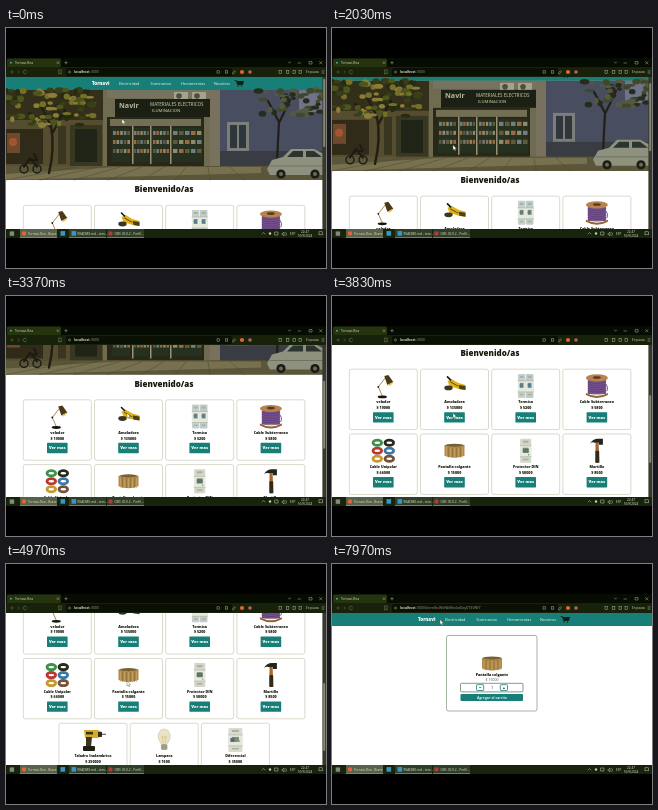
Write an HTML page that moves like this. It is 320 by 240 pixels and loops after 8000 ms.

```html
<!DOCTYPE html>
<html lang="es">
<head>
<meta charset="utf-8">
<title>Tienda</title>
<style>
html, body { margin: 0; width: 100%; height: 100%; overflow: hidden; background: #000; }
svg { display: block; width: 100%; height: 100%; }
text { font-family: "Open Sans", "Noto Sans", sans-serif; }
</style>
</head>
<body>
<svg id="stage" viewBox="0 0 320 240"></svg>
<script>
const TEAL = '#177f77', INK = '#15180c', ICON = '#aeb798';
const LOOP = 8000, NOTCH = 23.4;

const rect = (x, y, w, h, fill, extra = '') =>
  `<rect x="${x}" y="${y}" width="${w}" height="${h}" fill="${fill}" ${extra}/>`;
const dot = (x, y, r, fill, extra = '') =>
  `<circle cx="${x}" cy="${y}" r="${r}" fill="${fill}" ${extra}/>`;
const oval = (x, y, rx, ry, fill, extra = '') =>
  `<ellipse cx="${x}" cy="${y}" rx="${rx}" ry="${ry}" fill="${fill}" ${extra}/>`;
const shape = (d, fill) => `<path d="${d}" fill="${fill}"/>`;
const line = (d, color, w = 0.6) =>
  `<path d="${d}" fill="none" stroke="${color}" stroke-width="${w}" stroke-linecap="round" stroke-linejoin="round"/>`;
const text = (x, y, size, fill, str, extra = '') =>
  `<text x="${x}" y="${y}" font-size="${size}" fill="${fill}" ${extra}>${str}</text>`;
const mid = (x, y, size, fill, str, weight = 800) =>
  text(x, y, size, fill, str, `text-anchor="middle" font-weight="${weight}"`);
const group = (x, y, body) => `<g transform="translate(${x} ${y})">${body}</g>`;
const repeat = (n, fn) => Array.from({ length: n }, (_, i) => fn(i)).join('');

let seed = 11;
const random = () => (seed = (seed * 16807) % 2147483647) / 2147483647;

// Product drawings, centred on 0,0 and about 24 px tall
const module = (w, tint) =>
  rect(-w / 2, -12, w, 24, tint, 'rx="1"') +
  rect(-w / 2, -5, w, 11, '#e6e9dc') +
  rect(-w / 4, -3, w / 2, 5, '#7b8b80') +
  rect(-w / 4, -10, w / 2, 2, '#a8b1a2') +
  rect(-w / 4, 8, w / 2, 1.5, '#a8b1a2') +
  line(`M${-w / 2} -5H${w / 2}M${-w / 2} 6H${w / 2}`, '#9da695', 0.5);

const art = {
  lamp: () =>
    line('M-1 10L-5 1L2 -8', '#a5803a', 0.9) +
    shape('M1 -10L5 -11L10 -4L4 -1Z', '#4a3916') +
    shape('M4 -1L10 -4L9 -2L6 0Z', '#e8c65a') +
    dot(-5, 1, 0.9, INK) + oval(-1, 11, 4.6, 1.4, INK),
  grinder: () =>
    shape('M-7 -5L-3 -7L4 -3L11 -1V4L4 3L-5 0Z', '#e0b119') +
    shape('M4 -1L11 0V4L5 3Z', '#4a4116') +
    line('M-4 -4L3 0', '#5c4a0c', 1) +
    oval(-6, 2, 4.2, 2.4, '#3a3721') + line('M-4 -6L-7 -9', INK, 1.6),
  breaker: () =>
    group(-4, 0, module(7.5, '#c6d0cd')) + group(4, 0, module(7.5, '#bfcac9')) +
    rect(-6, -2, 3, 3, '#537e95') + rect(2, -2, 3, 3, '#537e95'),
  spool: () =>
    rect(-9, -7, 18, 15, '#76518f') +
    repeat(6, i => line(`M-9 ${-4 + i * 2.2}Q0 ${-1 + i * 2.2} 9 ${-4 + i * 2.2}`, '#4c3260', 0.5)) +
    oval(0, -8, 11, 3.6, '#b58350') + oval(0, -8.4, 4, 1.3, '#59391c') +
    shape('M-11 7Q0 13 11 7V9Q0 15 -11 9Z', '#94632f') +
    line('M8 -3Q12 1 10 5', '#76518f', 1),
  coils: () => ['#3d9148', '#262b1b', '#b9392e', '#3b78a5', '#c59a31', '#775038'].map((c, i) =>
    oval(i % 2 ? 6 : -6, -8 + (i >> 1) * 8, 4.3, 2.6, 'none', `stroke="${c}" stroke-width="2.8"`)).join(''),
  shade: () =>
    shape('M-10 -5V5Q0 9 10 5V-5Z', '#b18a4b') +
    repeat(9, i => line(`M${-8 + i * 2} -4V6.2`, i % 2 ? '#8c6a36' : '#caa768', 0.7)) +
    oval(0, -5, 10, 2, '#79602f') + line('M-10 -5Q0 -1.5 10 -5', '#d3b97f', 0.6),
  guard: () => module(11, '#d3d6c8') + rect(-3, -2, 6, 4, '#5f7466') + dot(3, 4, 0.7, '#4b9a54'),
  hammer: () =>
    shape('M-1.4 -8H1.7L2.5 12H-1.5Z', '#a9662c') +
    rect(-1.5, 0, 3.8, 12, '#302c19', 'rx="1"') +
    shape('M-7 -7Q-4 -12 1 -12H6V-6H2V-8H-2Q-5 -9 -7 -7Z', '#23251b'),
  drill: () =>
    shape('M-9 -10H5L8 -8V-4L5 -2H-8Z', '#d8aa26') +
    rect(5, -8, 4, 5, '#2d2b18') + rect(9, -6.2, 4, 1.2, '#66634c') +
    shape('M-7 -3H-1L-2 7H-7Z', '#3a351a') + rect(-10, 6, 12, 5, '#1f2013', 'rx="1"') +
    rect(-7, -8, 7, 2.5, '#373117'),
  bulb: () =>
    shape('M-3 4Q-7 -1 -6 -6Q-4 -11 0 -11Q4 -11 6 -6Q7 -1 3 4Z', '#e9e4c6') +
    line('M-3 4Q-7 -1 -6 -6Q-4 -11 0 -11Q4 -11 6 -6Q7 -1 3 4', '#c7c19b', 0.5) +
    line('M-1 3L-2 -4L0 -2L2 -4L1 3', '#d2a644', 0.5) +
    rect(-3, 4, 6, 6, '#aaa995', 'rx="1"') + line('M-3 6H3M-3 8H3', '#78775f', 0.5),
  diff: () => module(14, '#dadbd0') + rect(-5, -2, 4, 4, '#586b73') + dot(4, 1, 1, '#c9a43e')
};

const products = [
  ['velador', 19000, 'lamp'], ['Amoladora', 135000, 'grinder'],
  ['Termica', 5200, 'breaker'], ['Cable Subterraneo', 5800, 'spool'],
  ['Cable Unipolar', 66000, 'coils'], ['Pantalla colgante', 15000, 'shade'],
  ['Protector DIN', 50000, 'guard'], ['Martillo', 8500, 'hammer'],
  ['Taladro Inalambrico', 250000, 'drill'], ['Lampara', 1500, 'bulb'],
  ['Diferencial', 35000, 'diff']
];

function card([name, price, pic], i) {
  const row = i >> 2;
  const x = (row < 2 ? 51.3 : 87) + (i % 4) * 71.2;
  return group(x, 177 + row * 64.8,
    rect(-34, 0.3, 68, 60.4, '#fff', 'rx="2" stroke="#b3b599" stroke-width=".5"') +
    group(0, 17, art[pic]()) +
    mid(0, 34.4, 3.6, INK, name) + mid(0, 40.1, 3.6, INK, '$ ' + price) +
    rect(-10.3, 43.3, 20.6, 10.4, TEAL, 'rx=".6"') + mid(0, 49.8, 4, '#fff', 'Ver mas'));
}

const nav = () =>
  rect(0, 49, 320, 13, TEAL) +
  text(86, 56.8, 4.5, '#fff', 'Tornavi', 'font-weight="800"') +
  [['Electricidad', 113], ['Iluminacion', 144.5], ['Herramientas', 175], ['Nosotros', 208]]
    .map(([s, x]) => text(x, 56.6, 3.8, '#f3faf0', s)).join('') +
  line('M229 52.5H230.5L231.5 56.5H236', '#0c2116', 0.8) +
  shape('M230.5 53H238L237 56.7H231.5Z', '#0c2116') +
  dot(232.2, 58, 0.7, '#0c2116') + dot(235.5, 58, 0.7, '#0c2116');

const leaves = (n, x, y, w, h, colors) => repeat(n, i =>
  oval(x + w * random(), y + h * random() ** 1.4, 2 + 3 * random(), 1.4 + 2 * random(), colors[i % colors.length]));

// Street front in flat tones
const wall = () =>
  rect(0, 62, 320, 90, '#4b452b') +
  rect(0, 62, 98, 30, '#342f1b') + rect(0, 92, 98, 46, '#564c2f') +
  rect(0, 101, 37, 35, '#302b19') + rect(1, 105, 13, 20, '#6f492c') + dot(7, 114, 4, '#a35531') +
  rect(52, 98, 8, 38, '#393620') + rect(64, 97, 32, 41, '#383822') + rect(69, 101, 22, 33, '#1f2416');

const shop = () =>
  rect(97, 62, 107, 77, '#6e6b50') + rect(101, 62, 103, 8, '#777361') +
  [168, 186].map(x => rect(x, 64, 14, 8, '#a4a28b') + dot(x + 5, 68, 2.8, '#4d4d40')).join('') +
  rect(109, 71, 95, 18, '#1c2014') +
  text(113, 79.5, 7.2, '#b4b69b', 'Navir', 'font-weight="700"') +
  text(144, 77.8, 4.5, '#aaad8d', 'MATERIALES ELECTRICOS', 'font-weight="600"') +
  text(146, 84.2, 4.2, '#aaad8d', 'ILUMINACION', 'font-weight="600"') +
  rect(101, 89, 97, 49, '#292818') + rect(104, 91, 91, 7, '#736f55') +
  [[106, 18], [127, 16], [146, 17], [166, 30]].map(([x, w]) =>
    rect(x, 100, w, 34, '#26301f') +
    repeat(w, i => rect(x + 1 + (i % 5) * w / 5, 103 + (i % 3) * 9, w / 7, 4,
      ['#8e8c6d', '#605a3d', '#a06840', '#717d82'][i % 4]))).join('') +
  [126, 144, 164].map(x => rect(x, 98, 1.5, 38, '#999276')).join('');

const annex = () =>
  rect(204, 62, 12, 76, '#77715d') + rect(214, 62, 106, 75, '#494d60') +
  rect(221, 94, 22, 29, '#7c7f79') + rect(224, 97, 7, 23, '#30373c') + rect(233, 97, 7, 23, '#30373c') +
  rect(214, 123, 106, 15, '#393c42') + rect(293, 62, 27, 22, '#6f7288');

const car = () =>
  shape('M261 141L266 132L277 129L285 121H308L320 127V147H264Z', '#8f917f') +
  shape('M281 129L287 123H297V129ZM300 123H308L316 129H300Z', '#2c3430') +
  line('M264 138H320', '#676c60', 0.8) +
  [275, 309].map(x => dot(x, 146, 4.6, '#1b1d15') + dot(x, 146, 2, '#6a6b59')).join('');

const hero = () =>
  wall() + shop() + annex() +
  shape('M0 138H320V152H0Z', '#5b5539') + shape('M0 146L110 139H255V145L0 152Z', '#787150') +
  repeat(8, i => line(`M${i * 34} 152L${70 + i * 22} 139`, '#4d472e', 0.5)) +
  line('M43 145Q49 120 45 98L34 76M46 106L59 82M45 99L23 85', '#231f10', 2.4) +
  leaves(85, 0, 62, 87, 36, ['#252c0f', '#4c551c', '#747029', '#383e18', '#8a7d3a']) +
  line('M271 133L273 94L262 73M273 95L284 72', '#211f17', 2.2) +
  leaves(45, 252, 62, 66, 26, ['#262b1b', '#40482a', '#555741']) +
  line('M18 139L24 130L31 139M23 132H31L28 126', '#191a12', 1.8) +
  [18, 31].map(x => dot(x, 141, 4, 'none', 'stroke="#191a12" stroke-width="1.4"')).join('') +
  car();

const home = () =>
  nav() + hero() + mid(158, 164, 8, INK, 'Bienvenido/as') + products.map(card).join('');

const detail = () =>
  rect(114.5, 71.5, 90.5, 75.5, '#fff', 'rx="2" stroke="#81927a" stroke-width=".7"') +
  group(160, 99.5, art.shade()) +
  mid(160, 111.7, 3.6, INK, 'Pantalla colgante') + mid(160, 117.1, 3.5, '#555b48', '$ 15000', 400) +
  rect(128.5, 119.3, 62.5, 8.6, '#fff', 'rx="1" stroke="#4f6f5e" stroke-width=".7"') +
  [[144.5, '−'], [168.3, '+']].map(([x, s]) =>
    rect(x, 120.7, 7.2, 5.8, '#fff', `rx=".7" stroke="${TEAL}" stroke-width=".8"`) +
    mid(x + 3.6, 125.1, 4.2, INK, s)).join('') +
  mid(160, 125, 3.7, INK, '1', 400) +
  rect(128.5, 130, 62.5, 7, TEAL, 'rx="1"') + mid(160, 134.8, 3.6, '#fff', 'Agregar al carrito', 600);

const browser = () =>
  rect(0, 30, 320, 9, '#070c03') + rect(1, 30.5, 54, 8.5, '#25340f', 'rx="1.5"') +
  dot(5, 34.7, 1, '#4d9da5') + text(9, 36, 3.3, '#d8dfc4', 'Tornavi-Rea') +
  line('M51 33.7L53 35.7M53 33.7L51 35.7M58.8 34.7H61.2M60 33.5V35.9', ICON, 0.5) +
  line('M282.5 34L283.5 35.2L284.5 34M292 35H294.5M303.5 33.5H306V36H303.5ZM313.5 33.5L316 36M316 33.5L313.5 36', ICON, 0.5) +
  rect(0, 39, 320, 10, '#18220b') + rect(60, 40, 166, 8, '#0a1104', 'rx="1.5"') +
  line('M6.5 42.8L5 44L6.5 45.2M5 44H7.5M12 42.8L13.5 44L12 45.2', '#66704f', 0.5) +
  line('M20.5 43A1.8 1.8 0 1 0 20.5 45M53 42H55.2V46L54.1 45L53 46Z', '#7f8969', 0.5) +
  dot(63.5, 44, 1, 'none', `stroke="${ICON}" stroke-width=".5"`) +
  text(68, 45.3, 3.6, '#f8faea', 'localhost<tspan fill="#929c80" font-weight="400">:3000<tspan id="path"></tspan></tspan>', 'font-weight="600"') +
  [212, 220.5].map(x => rect(x - 1, 42.8, 2.3, 2.3, 'none', `stroke="${ICON}" stroke-width=".5"`)).join('') +
  line('M226.5 44.8L228.5 42.8L229.5 43.8L227.5 45.8Z', ICON, 0.5) +
  dot(236, 44, 2.1, '#df6538') + dot(244, 44, 1.8, '#b5635c') +
  [273, 280.5, 287, 293].map(x => rect(x, 42.6, 2.4, 2.8, 'none', `stroke="${ICON}" stroke-width=".5"`)).join('') +
  text(300, 45.2, 3, '#d5dbc4', 'En pausa') +
  line('M316 42.7H318M316 44H318M316 45.3H318', ICON, 0.4);

const task = (x, w, fill) => rect(x, 201, w, 9, fill) + rect(x, 209.2, w, 0.8, '#6f9999');

const taskbar = () =>
  rect(0, 201, 320, 9, '#17230d') +
  task(14, 37, '#56634a') + task(63, 37, '#2f3e27') + task(101, 37, '#2f3e27') +
  rect(3.7, 203.4, 4.4, 4.4, '#7f8e79') +
  dot(18, 205.5, 2.2, '#e3643a') + text(22, 206.8, 3.2, '#f0d9bd', 'Tornavi-Rea - Brave') +
  rect(54.5, 203.1, 4.6, 4.6, '#3b96c4') +
  rect(65.5, 203.1, 4.6, 4.6, '#3b96c4') + text(71.5, 206.8, 3.2, '#e2e6d2', 'README.md - torn...') +
  dot(104.5, 205.5, 2.2, '#b93932') + text(108.5, 206.8, 3.2, '#e2e6d2', 'OBS 30.0.2 - Perfil...') +
  line('M256 206L257.5 204.5L259 206M269 204H272V207H269ZM276 206L278 204V208L276 206M280 204.5Q281 206 280 207.5', '#cbd3b9', 0.5) +
  dot(264, 205.5, 1.2, '#c9d1b7') + text(284, 206.8, 3.1, '#e2e6d2', 'ESP') +
  mid(299, 204.7, 3.1, '#e2e6d2', '22:47', 400) + mid(299, 208.9, 3.1, '#e2e6d2', '16/9/2024', 400) +
  rect(313, 203.8, 3.4, 3, 'none', 'stroke="#cbd3b9" stroke-width=".5"');

const stage = document.getElementById('stage');
stage.innerHTML =
  '<defs><clipPath id="view"><rect x="0" y="49" width="320" height="152"/></clipPath></defs>' +
  rect(0, 0, 320, 240, '#000') +
  '<g clip-path="url(#view)">' + rect(0, 49, 320, 152, '#fff') +
  `<g id="home"><g id="page">${home()}</g>` +
  rect(316.4, 49, 3.6, 152, '#35382a') + rect(317.2, 51, 2, 68, '#85886f', 'id="thumb" rx="1"') + '</g>' +
  `<g id="item">${nav()}<g id="detail">${detail()}</g></g>` +
  '<g id="status">' + rect(0, 195.5, 64, 5.5, '#4c563b', 'rx=".8"') +
  text(1.5, 199.5, 2.9, '#dde2ca', 'localhost:3000/item/bsWeNbWsxIwDay0T3VNf7') + '</g></g>' +
  browser() + taskbar() +
  '<path id="cursor" d="M0 0V5L1.2 4L2 5.8L2.8 5.4L2 3.7H3.6Z" fill="#fffde8" stroke="#555942" stroke-width=".4"/>';

const part = id => document.getElementById(id);
const [homeEl, pageEl, thumbEl, itemEl, detailEl, statusEl, cursorEl, pathEl] =
  ['home', 'page', 'thumb', 'item', 'detail', 'status', 'cursor', 'path'].map(part);
const show = (el, on) => el.setAttribute('display', on ? 'inline' : 'none');
const move = (el, x, y) => el.setAttribute('transform', `translate(${x} ${y})`);
const clamp = v => Math.min(1, Math.max(0, v));

// Wheel turns: start, duration, notches
const wheel = [
  [1957, 290, 1], [2400, 290, 1], [2920, 280, 1], [3345, 290, 1],
  [3745, 290, 1], [4280, 280, 1], [4560, 250, 1], [4924, 210, -2]
];
const scrollAt = t => wheel.reduce((sum, [start, span, n]) =>
  sum + n * NOTCH * Math.sin(clamp((t - start) / span) * Math.PI / 2), 0);

// Pointer stops: time, x, y
const stops = [
  [0, 116, 91], [870, 116, 91], [1670, 121, 117], [5140, 121, 117],
  [5650, 114, 172.5], [6480, 114, 172.5], [6860, 124, 139],
  [7250, 124, 139], [7700, 115, 73], [7960, 108, 55.5], [8000, 108, 55.5]
];
function pointerAt(t) {
  const i = stops.findIndex(s => s[0] > t);
  const [a, b] = [stops[i - 1], stops[i]];
  const u = (t - a[0]) / (b[0] - a[0]);
  const k = u * u * (3 - 2 * u);
  return [a[1] + (b[1] - a[1]) * k, a[2] + (b[2] - a[2]) * k];
}

function draw(t) {
  const opened = t >= 6070;
  const scroll = scrollAt(t);
  show(homeEl, !opened);
  show(itemEl, opened);
  show(detailEl, t >= 6900);
  show(statusEl, t >= 5600 && t < 6800);
  move(pageEl, 0, -scroll);
  move(thumbEl, 0, scroll * 0.46);
  move(cursorEl, ...pointerAt(t));
  pathEl.textContent = opened ? '/item/bsWeNbWsxIwDay0T3VNf7' : '';
}

const began = performance.now();
function tick() {
  draw((performance.now() - began) % LOOP);
  requestAnimationFrame(tick);
}
tick();
</script>
</body>
</html>
```
